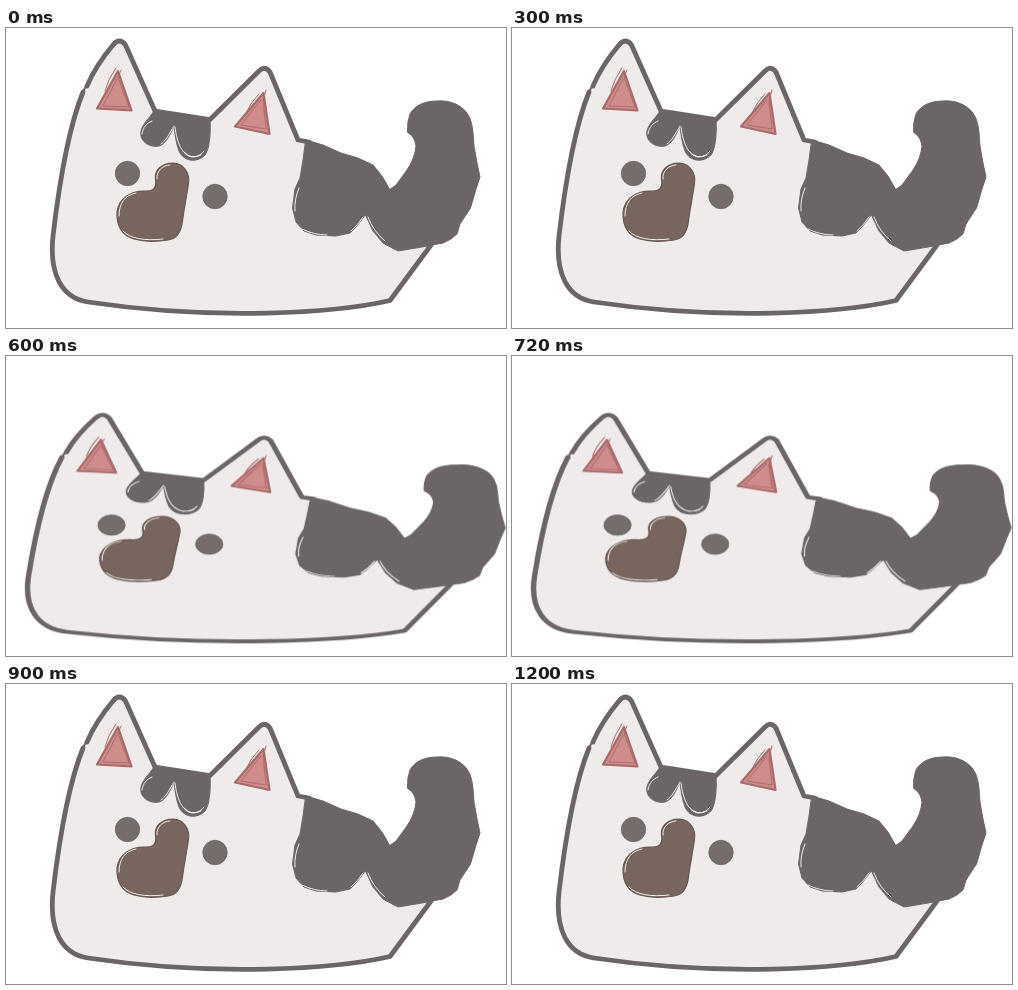
Write an HTML page that moves like this. It is 500 by 300 pixels and loops after 1400 ms.

```html
<!DOCTYPE html>
<html lang="en">
<head>
<meta charset="utf-8">
<title>Squashing cat</title>
<style>
  html, body { margin: 0; width: 100%; height: 100%; overflow: hidden; background: #fff; }
  svg { display: block; width: 500px; height: 300px; }
  #cat { transform-origin: 258.5px 286px; }
  path { stroke-linecap: round; stroke-linejoin: round; }
  .line { fill: none; stroke: #6b6565; stroke-width: 4.8; }
  .dark { fill: #6b6565; stroke: #6b6565; stroke-width: 1; }
  .eye { fill: #756d6c; stroke: #6b6565; stroke-width: 0.8; }
  .ear { fill: #ce8c8b; stroke: #aa6a6b; stroke-width: 2.2; }
  .hair { fill: none; stroke: #a96c6c; stroke-width: 1; }
  .nose { fill: #78655d; stroke: #665650; stroke-width: 1.2; }
  .chalk { fill: none; stroke: #f1eeed; stroke-width: 1; }
</style>
</head>
<body>
<svg viewBox="0 0 500 300">
  <g id="cat">
    <!-- body -->
    <path fill="#efebea" d="M80 58L107 18Q113.500 9 119.500 17L149 83L204 91.500L253 43Q258.500 37 264 44L292 112L303 114L384 162L440 196L384 272.500C330 285 210 293 82 274C55 270 43 245 47 208C53 157 62 101 78 61Z"/>
    <path class="line" d="M81 58C87 44 96 30 107 17Q113.500 9 119.500 17L149 83L204 91.500L253 43Q258.500 37 264 44L292 112L303 114"/>
    <path class="line" d="M425 217L384 272.500C330 285 210 293 82 274C55 270 43 245 47 208C53 157 62 101 77 64"/>
    <path class="line" style="stroke-width:2" d="M76 66L80 58"/>

    <!-- ears -->
    <path class="ear" d="M112 43L91 80.500L125.500 82.500Z"/>
    <path class="hair" d="M110 40Q102 51 99 63M115 42L112 49L123 79L97 78L111 51"/>
    <path class="ear" d="M257.500 65L229 98.500L263.500 106Z"/>
    <path class="hair" d="M253 66Q245 74 241 83M260 62L257 73L260 101L235 97L255 72"/>

    <!-- forehead -->
    <path class="dark" d="M148 83L204 91C205 108 203 122 199 127C191 135 178 134 173 123C170 115 169 107 168 98C164 107 160 116 153 118C142 120 133 112 135 103C137 95 143 91 148 83Z"/>
    <path class="chalk" d="M168 98C163 106 160 113 155 116M136 106C137 99 141 95 146 93"/>
    <path class="chalk" d="M169 99C171 115 176 127 186 129Q194 129 198 123M178 124Q185 132 195 127"/>

    <!-- eyes -->
    <circle class="eye" cx="121.500" cy="145.500" r="12.200"/>
    <circle class="eye" cx="209" cy="168.500" r="12.200"/>

    <!-- nose -->
    <path class="nose" d="M149.500 152C148 142 156 135 167 135C178 135 184 146 182.500 155C181 167 178 180 176.500 193C175 206 170 211 162 212C150 214 138 214 128 211C115 207 110.500 196 111 184C113 170 125 163 138 163C147 164 151 160 149.500 152Z"/>
    <path class="chalk" d="M151 151C150 143 157 137 164 137M113 188C113 175 119 167 130 165M117 203C124 211 140 213 157 211"/>

    <!-- back patch -->
    <path class="dark" d="M300 112L317 117L335 125L352 130L367 137L376 148L384 162L360 186L350 199L344 205L330 208L310 207L298 203L290 194L286.500 180L289 161L294 150L297 132Z"/>
    <path class="chalk" d="M293 160Q288 172 289 183M296 201Q308 207 321 207M345 203Q352 197 357 189"/>

    <!-- tail -->
    <path class="dark" d="M401.500 104Q401 94 404 86C409 77 419 73 431 73C444 72 455 77 461 85C467 94 467 104 468 118L471 135L474 149L470 161L464.500 180L454 196L451 206L445 211L437 215L416 219L392 223L377 215L367 203L359 186L383 162L390 157L401 142Q409 130 410 118Q409 111 406 108Z"/>
    <path class="chalk" d="M362 189Q367 203 379 213"/>
  </g>
</svg>
<script>
  const LOOP = 1400;
  // start time in ms, horizontal scale, vertical scale
  const poses = [
    [0, 1, 1],
    [500, 1.056, 0.9124],
    [600, 1.1166, 0.832],
    [800, 1.056, 0.9124],
    [900, 1, 1],
    [LOOP, 1, 1]
  ];
  const frames = poses.map(([t, sx, sy]) => ({
    offset: t / LOOP,
    transform: `scale(${sx}, ${sy})`,
    easing: 'steps(1, end)'
  }));
  document.getElementById('cat').animate(frames, { duration: LOOP, iterations: Infinity });
</script>
</body>
</html>
```
